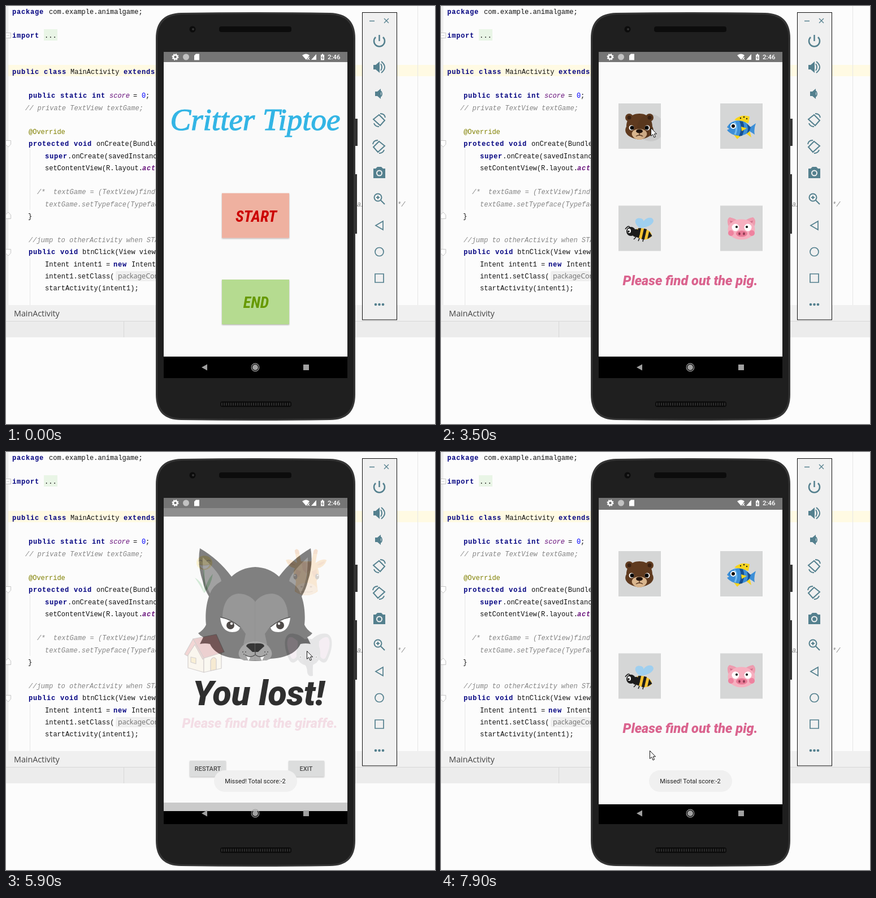
These frames come from a looping animation (759 px wide and 738 px high, 8 s). An HTML page:

```html
<!DOCTYPE html>
<html lang="en">
<head>
<meta charset="utf-8">
<title>Phone game demo</title>
<style>
html, body { margin: 0; width: 100%; height: 100%; overflow: hidden; background: #fcfcfc; }
svg { display: block; width: 759px; height: 738px; }
text { white-space: pre; font-family: Roboto, sans-serif; }
.code text { font: 12px "Liberation Mono", monospace; fill: #111; }
.code .k { font-weight: 700; letter-spacing: .8px; fill: #000080; }
.code .c { font-style: italic; fill: #858585; }
.code .f { font-style: italic; fill: #660e7a; }
.code .n { fill: #0000ff; }
.code .a { fill: #808000; }
.mid { text-anchor: middle; }
.ask { font: italic 900 23.5px Roboto, sans-serif; fill: #da638e; text-anchor: middle; }
.big { font: italic 700 28px "Roboto Condensed", Roboto, sans-serif; font-stretch: 75%; text-anchor: middle; }
.small { font: 500 11px Roboto, sans-serif; fill: #222; text-anchor: middle; }
.line { fill: none; stroke: #54808e; stroke-width: 2; }
</style>
</head>
<body>
<svg viewBox="0 0 759 738">
<defs>
  <clipPath id="glass"><rect x="279" y="81" width="325" height="576"/></clipPath>
  <clipPath id="bearTile"><rect x="314" y="172" width="75" height="80"/></clipPath>
  <clipPath id="restartTile"><rect x="325" y="530" width="64" height="28"/></clipPath>
  <filter id="soft" x="-10%" y="-10%" width="120%" height="130%">
    <feDropShadow dx="0" dy="1.2" stdDeviation=".8" flood-opacity=".3"/>
  </filter>

  <g id="pane">
    <rect x="279" y="81" width="325" height="576" fill="#fafafa"/>
    <rect x="279" y="81" width="325" height="18" fill="#757575"/>
    <rect x="279" y="619" width="325" height="60"/>
  </g>

  <g id="bear">
    <g fill="#5f3a1f"><circle cx="333" cy="197" r="7"/><circle cx="369" cy="197" r="7"/>
    <path d="M351 190C367 190 374 201 374 213C380 223 371 233 351 236C331 233 322 223 328 213C328 201 335 190 351 190Z"/></g>
    <g fill="#3b2212"><circle cx="333" cy="197" r="3.5"/><circle cx="369" cy="197" r="3.5"/></g>
    <path d="M351 217C360 217 366 222 364 228C361 234 356 236 351 236S341 234 338 228C336 222 342 217 351 217Z" fill="#d9b58d"/>
    <g fill="#fff"><circle cx="337" cy="215" r="4.5"/><circle cx="365" cy="215" r="4.5"/></g>
    <circle cx="338" cy="215" r="3.5"/><circle cx="364" cy="215" r="3.5"/>
    <ellipse cx="351" cy="221" rx="6" ry="3.5" fill="#21130c"/>
    <path d="M351 224V229M345 230Q351 226 357 230" fill="none" stroke="#5b3923" stroke-width="1.5"/>
  </g>

  <g id="fish">
    <path d="M519 201Q530 190 546 195L544 207ZM517 226L524 235L532 228ZM540 225L549 232L546 220Z" fill="#f7d51e"/>
    <g fill="#222"><circle cx="530" cy="198" r="1.2"/><circle cx="536" cy="196" r="1.3"/><circle cx="541" cy="199" r="1.2"/></g>
    <path d="M506 214C514 199 537 198 547 214L557 207Q553 218 555 227L546 221C535 233 515 231 506 219L510 217Z" fill="#3d8fd7"/>
    <path d="M528 203Q534 215 527 230L533 229Q539 215 534 204ZM541 208Q545 217 541 225L546 220L548 214Z" fill="#174f91"/>
    <path d="M519 205Q526 214 520 227" fill="none" stroke="#73bbed" stroke-width="3"/>
    <path d="M531 213L541 216L532 221Z" fill="#f7d51e"/>
    <circle cx="517" cy="212" r="5" fill="#fff"/><circle cx="517" cy="212" r="3"/>
  </g>

  <g id="bee">
    <path d="M352 392C338 382 344 372 354 375C361 377 359 385 352 392Q360 371 372 374C382 379 372 391 352 392Z" fill="#9fcfef"/>
    <g transform="rotate(13 356 402)"><ellipse cx="357" cy="402" rx="16" ry="9.5" fill="#f7c331"/>
    <path d="M347 394L352 393V411L347 410ZM357 392.5H362V411.5H357ZM367 395L374 402L367 409Z" fill="#1c1c1c"/></g>
    <circle cx="345" cy="401" r="7" fill="#1c1c1c"/><circle cx="336" cy="398" r="8" fill="#1c1c1c"/>
    <ellipse cx="333" cy="397" rx="3" ry="4" fill="#fff"/><circle cx="332" cy="398" r="1.7"/>
    <path d="M334 391Q332 386 326 394M345 408L341 412M351 410L349 415M358 411L357 416" fill="none" stroke="#1c1c1c" stroke-width="1.5"/>
  </g>

  <g id="pig">
    <path d="M509 390Q504 376 511 373Q520 375 525 379H538Q545 374 552 373Q559 378 554 390Z" fill="#ee9caf"/>
    <path d="M511 379L514 386L519 381ZM552 379L549 386L544 381Z" fill="#cf6e88"/>
    <ellipse cx="531.5" cy="394.5" rx="24" ry="18" fill="#f6afbf"/>
    <g fill="#ee829f"><circle cx="513" cy="401" r="5"/><circle cx="550" cy="401" r="5"/></g>
    <g fill="#fff"><circle cx="521" cy="391" r="6.5"/><circle cx="543" cy="391" r="6.5"/></g>
    <circle cx="523" cy="390" r="2"/><circle cx="541" cy="390" r="2"/>
    <ellipse cx="532" cy="402" rx="10" ry="5.5" fill="#e77995"/>
    <ellipse cx="528" cy="402" rx="1.8" ry="2.6" fill="#8d3850"/><ellipse cx="536" cy="402" rx="1.8" ry="2.6" fill="#8d3850"/>
  </g>

  <g id="flower">
    <path d="M350 208L351 248" stroke="#43ad52" stroke-width="2"/>
    <path d="M350 249Q348 229 334 222Q345 237 350 249ZM351 249Q354 228 366 215Q363 235 351 249Z" fill="#35a748"/>
    <ellipse cx="351" cy="195.5" rx="14" ry="12.5" fill="#fbd52c"/>
    <path d="M340 193Q344 189 347 193M355 193Q359 189 362 193" fill="none" stroke="#6d4c14" stroke-width="1.6"/>
    <path d="M341 198Q351 202 361 198Q358 207 351 207T341 198Z" fill="#fff" stroke="#b37a16"/>
  </g>

  <g id="giraffeHalf">
    <path d="M531 193H522L518 174Q514 169 511 174L515 196Q502 187 495 191Q500 204 511 205Q506 216 513 228L511 246Q520 253 531 253Z" fill="#f6a032"/>
    <path d="M511 174Q514 169 518 174L519 180H512ZM498 193Q505 193 512 200Q503 201 498 193ZM523 195H531V214L525 208ZM513 207L522 211L518 221L512 217Z" fill="#dc721b"/>
    <path d="M531 231Q518 231 511 242Q516 253 531 253Z" fill="#f3b878"/>
    <ellipse cx="512" cy="220" rx="3.5" ry="5" fill="#3a2412"/><circle cx="511" cy="218" r="1.3" fill="#fff"/>
    <ellipse cx="523" cy="238" rx="2" ry="1.4" fill="#8b4c1f"/>
    <path d="M520 246Q526 248 531 247" fill="none" stroke="#a35e2b"/>
  </g>

  <g id="house" stroke="#351e19" stroke-linejoin="round" stroke-width="1.2">
    <path d="M322 356L335 338L350 363V389L322 381Z" fill="#fbe9bf"/>
    <path d="M350 362L381 354V382L350 389Z" fill="#fff1cf"/>
    <path d="M331 330L372 322L386 353L350 364Z" fill="#b3201f"/>
    <path d="M331 330L316 357L321 360L334 340L348 366L350 364Z" fill="#d7433a"/>
    <path d="M362 386V368Q367 359 372 366V384Z" fill="#e7a82b"/>
    <path d="M327 362L336 364V374L327 371Z" fill="#f8c53d"/>
  </g>

  <g id="elephantHalf">
    <path d="M535 338Q520 318 502 321C489 326 493 350 500 364Q505 378 516 367Z" fill="#929298"/>
    <path d="M516 334Q506 324 500 328C494 337 500 354 505 364Q511 369 517 356Z" fill="#e3bfd9"/>
    <path d="M536 329Q512 332 514 361Q518 374 531 377H536Z" fill="#929298"/>
    <circle cx="521" cy="362" r="2.4" fill="#fff"/><circle cx="521" cy="362" r="1.6"/>
  </g>

  <g id="wolfHalf">
    <path d="M441.500 188Q416 189 399 205Q376 174 343 155Q338 183 348 213Q351 227 359 240C352 260 353 282 354 290Q350 299 340 305Q344 310 349 312L343 324Q352 322 361 324C368 340 388 349 414 350Q424 354 441.500 354Z" fill="#646464"/>
    <path d="M348 171Q379 199 381 213Q365 222 361 235Q347 210 348 171Z" fill="#8d8d8d"/>
    <path d="M441.500 250Q430 235 411 235C390 237 383 257 383 278L414 292L424 306L420 325H441.500Z" fill="#808080"/>
    <path d="M379 277Q397 281 414 294Q413 303 400 303Q381 302 379 277Z" fill="#fff"/>
    <path d="M379 276.500Q398 280 414 294" fill="none" stroke="#333" stroke-width="1.500"/>
    <circle cx="397" cy="291" r="7" fill="#27211f"/><circle cx="399" cy="288" r="2.2" fill="#fff"/>
    <path d="M441.500 319Q420 320 413 335Q408 347 421 353H441.500Z" fill="#949494"/>
    <path d="M441.500 323Q425 322 425 328Q432 334 436 338H441.500Z" fill="#080808"/>
    <path d="M425 345L429 354L433 346Z" fill="#fff"/>
    <path d="M441 338V343Q432 350 423 343" fill="none" stroke="#282828" stroke-width="1.4"/>
    <g fill="#333"><circle cx="419" cy="338" r="1"/><circle cx="424" cy="338" r="1"/><circle cx="421" cy="342" r="1"/></g>
  </g>

  <g id="title">
    <use href="#pane"/>
    <text x="441" y="219" class="mid" style="font:italic 55px 'Liberation Serif',serif" fill="#33b5e5" stroke="#33b5e5" stroke-width="1.2">Critter Tiptoe</text>
    <g filter="url(#soft)"><rect x="382" y="330.500" width="119" height="79" fill="#efb1a0"/><rect x="382" y="483" width="119" height="79" fill="#b5db90"/></g>
    <text x="442.500" y="381" class="big" fill="#cc0000">START</text>
    <text x="442.500" y="533" class="big" fill="#669900">END</text>
  </g>

  <g id="first">
    <use href="#pane"/>
    <path d="M314 172h75v80h-75zM494 172h75v80h-75zM314 352.500h75v80h-75zM494 352.500h75v80h-75z" fill="#d5d6d6"/>
    <use href="#bear"/><use href="#fish"/><use href="#bee"/><use href="#pig"/>
    <text x="441" y="493" class="ask">Please find out the pig.</text>
  </g>

  <g id="second">
    <use href="#pane"/>
    <use href="#flower"/><use href="#house"/>
    <use href="#giraffeHalf"/><use href="#giraffeHalf" transform="matrix(-1 0 0 1 1062.500 0)"/>
    <use href="#elephantHalf"/><use href="#elephantHalf" transform="matrix(-1 0 0 1 1070 0)"/>
    <path d="M526 360H545Q542 376 543 395Q535 398 533 389Q533 378 526 372Z" fill="#88888f"/>
    <text x="449" y="487" class="ask">Please find out the giraffe.</text>
  </g>

  <g id="lost">
    <use href="#pane"/>
    <use href="#wolfHalf"/><use href="#wolfHalf" transform="matrix(-1 0 0 1 882 0)"/>
    <text x="447" y="432" class="mid" style="font:italic 900 61px Roboto,sans-serif">You lost!</text>
    <g filter="url(#soft)"><rect x="325" y="530" width="64" height="28" rx="1" fill="#d6d7d7"/><rect x="500" y="530" width="63" height="28" rx="1" fill="#d6d7d7"/></g>
    <text x="357" y="548" class="small">RESTART</text>
    <text x="531" y="548" class="small">EXIT</text>
  </g>
</defs>

<rect width="759" height="738" fill="#fcfcfc"/>
<path d="M0 104H759V124H0Z" fill="#fffae3"/>
<path d="M0 0H4V528H0Z" fill="#f0f0f0"/>
<path d="M3.500 0V528M42.500 253V360M42.500 445V528M728.500 0V528" fill="none" stroke="#e6e6e6"/>
<path d="M0 528H759V556H0Z" fill="#f0f0f0"/>
<path d="M0 556H759V585H0Z" fill="#ececec"/>
<path d="M0 556.500H759M208.500 556V585" stroke="#d8d8d8"/>
<g fill="#fff" stroke="#c6c6c6"><path d="M-1 237.500H8.500V244L4 249L-1 244ZM-1 429.500H8.500V436L4 441L-1 436ZM-1 375.500H8.500V369L4 364L-1 369ZM-1 47.500H8.500V56.500H-1ZM1 52H6"/></g>
<rect x="67" y="41" width="24" height="20" fill="#e9f5e6"/>
<rect x="194" y="468" width="90" height="18" rx="3" fill="#efefef"/>
<text x="198" y="481" style="font:12.500px 'Noto Sans',sans-serif" fill="#777">packageContext:</text>
<text x="14" y="548" style="font:14.300px 'Open Sans',sans-serif" fill="#444">MainActivity</text>
<g class="code" id="code"></g>

<rect x="630.500" y="11.500" width="61" height="542.500" fill="#f0f0f0" stroke="#111"/>
<path d="M643 26.500H652M669 22L677 30M677 22L669 30" class="line" style="stroke-width:1.300"/>
<g class="line">
  <path d="M654 55A9.500 9.500 0 1 0 667 55M660.500 51V62" stroke-width="2.500"/>
  <path d="M663 102Q667 108 663 114M664 98Q676 108 664 118"/>
  <path d="M663 150Q667 155 663 160"/>
  <g id="turn"><path d="M660 192L670 202L662 211L650 200Z"/><path d="M651 207Q653 213 660 213M662 190Q670 190 671 197"/></g>
  <use href="#turn" transform="matrix(-1 0 0 1 1320 47)"/>
  <circle cx="658" cy="338" r="6.500"/><path d="M663 343L670 350M655 338H661M658 335V341"/>
  <path d="M667 380V395L654 387.500Z" stroke-width="1.700"/><circle cx="660.500" cy="434" r="7.500" stroke-width="1.700"/><path d="M653 473H668V488H653Z" stroke-width="1.700"/>
</g>
<g fill="#54808e">
  <path d="M650 104H654L661 98V118L654 112H650ZM653 151H657L663 146V164L657 159H653ZM650 287H654L657 284H664L667 287H671V304H650Z"/>
  <circle cx="654" cy="527" r="2.300"/><circle cx="660.500" cy="527" r="2.300"/><circle cx="667" cy="527" r="2.300"/>
</g>
<circle cx="660.500" cy="295" r="4.500" fill="#54808e" stroke="#f0f0f0" stroke-width="2"/>

<path d="M617 199H622V247H617ZM617 297H621V402H617Z" fill="#333"/>
<path d="M310 12Q441 10 573 12Q618 13 618 57V686Q618 731 573 731Q441 733 310 731Q265 731 265 686V57Q265 13 310 12Z" fill="#353535"/>
<path d="M311 15Q441 13 572 15Q615 16 615 58V685Q615 728 572 728Q441 730 311 728Q268 728 268 685V58Q268 16 311 15Z" fill="#1f1f1f"/>
<rect x="377" y="36" width="128" height="10" rx="4" fill="#0c0c0c"/>
<rect x="379" y="698" width="126" height="10" rx="4" fill="#0c0c0c"/>
<path d="M381 703H503" stroke="#2e2e2e" stroke-width="5" stroke-dasharray="2 2"/>
<circle cx="330" cy="41" r="5.500" fill="#0c0c0c"/><circle cx="331" cy="41" r="2" fill="#333"/>

<g clip-path="url(#glass)">
  <use id="under"/>
  <g clip-path="url(#bearTile)"><circle id="bearRipple" cx="371" cy="215"/></g>
  <g clip-path="url(#restartTile)"><circle id="restartRipple" cx="365" cy="534"/></g>
  <use id="over"/>
  <g fill="#fff">
    <circle cx="299.500" cy="90" r="3.500" fill="none" stroke="#fff" stroke-width="2.600"/>
    <circle cx="299.500" cy="90" r="5.300" fill="none" stroke="#fff" stroke-width="1.500" stroke-dasharray="2.100 2.060"/>
    <circle cx="318.500" cy="90" r="5.500" fill="#c2c2c2"/>
    <path d="M336 84.500H342V95.500H333V87.500ZM524 87Q531 82 537 87L531 95ZM540 95H549V85ZM557 86H559V84.500H561V86H563V95.500H557Z"/>
    <path d="M533 90L537 95M537 90L533 95" stroke="#fff" stroke-width="1.200"/>
    <path d="M560.500 88L558.500 91.500H561.500L559.500 94" fill="none" stroke="#757575"/>
    <text x="569" y="94" style="font:500 11.500px Roboto,sans-serif">2:46</text>
  </g>
  <g fill="#a1a1a1"><path d="M356 632.500V643.500L346 638ZM526 633H536V643H526Z"/><circle cx="441" cy="638" r="5"/><circle cx="441" cy="638" r="6.800" fill="none" stroke="#a1a1a1" stroke-width="1.200"/></g>
  <g id="toast"><rect x="368" y="562" width="147" height="38" rx="19" fill="#f0f0f0"/><text id="message" x="441" y="585" class="small" style="font-weight:400"></text></g>
</g>
<path id="cursor" d="M.500 .500V14.500L3.800 11.500L6 17L8.500 16L6.300 10.800H10.500Z" fill="#fff" stroke="#111"/>
</svg>

<script>
const el = id => document.getElementById(id);
const clamp = v => Math.max(0, Math.min(1, v));

// Each line: baseline, then x / class / text triples.
const lines = [
  [14, 11, 'k', 'package', 76, '', 'com.example.animalgame;'],
  [56, 11, 'k', 'import', 68, '', '...'],
  [120, 11, 'k', 'public class', 114, '', 'MainActivity', 208, 'k', 'extends'],
  [162, 40, 'k', 'public static int', 183, 'f', 'score', 225, '', '=', 240, 'n', '0', 247, '', ';'],
  [184, 34, 'c', '// private TextView textGame;'],
  [226, 40, 'a', '@Override'],
  [247, 40, 'k', 'protected void', 160, '', 'onCreate(Bundle'],
  [269, 69, 'k', 'super', 109, '', '.onCreate(savedInstance'],
  [290, 69, '', 'setContentView(R.layout.', 241, 'k f', 'act'],
  [332, 55, 'c', '/*  textGame = (TextView)find'],
  [354, 69, 'c', 'textGame.setTypeface(Typeface', 621, 'c', 'ai', 692, 'c', '*/'],
  [375, 39, '', '}'],
  [417, 40, 'c', '//jump to otherActivity when START'],
  [438, 40, 'k', 'public void', 135, '', 'btnClick(View view'],
  [460, 69, '', 'Intent intent1 =', 190, 'k', 'new', 222, '', 'Intent'],
  [481, 69, '', 'intent1.setClass('],
  [502, 69, '', 'startActivity(intent1);']
];
for (const [y, ...parts] of lines) {
  for (let i = 0; i < parts.length; i += 3) {
    const t = document.createElementNS('http://www.w3.org/2000/svg', 'text');
    t.setAttribute('x', parts[i]);
    t.setAttribute('y', y);
    t.setAttribute('class', parts[i + 1]);
    t.textContent = parts[i + 2];
    el('code').append(t);
  }
}

const screens = [[-1000, 'title'], [1700, 'first'], [4200, 'second'], [5800, 'lost'], [7700, 'first']];
const cursorPath = [
  [300, 694, 106], [800, 441, 356], [2500, 441, 356], [2900, 371, 215], [4200, 371, 215],
  [4700, 507, 305], [4900, 532, 351], [6200, 532, 351], [6500, 400, 563], [6700, 365, 534],
  [7600, 365, 534], [7700, 369, 527]
];

function cursorAt(t) {
  const i = cursorPath.findIndex(k => k[0] > t);
  if (i < 0) return cursorPath.at(-1).slice(1);
  const [t0, x0, y0] = cursorPath[i - 1], [t1, x1, y1] = cursorPath[i];
  const p = (t - t0) / (t1 - t0);
  return [x0 + (x1 - x0) * p, y0 + (y1 - y0) * p];
}

function ripple(id, t, start, end, radius) {
  const on = t >= start && t < end;
  el(id).setAttribute('r', on ? radius * clamp((t - start + 100) / 200) : 0);
  el(id).setAttribute('opacity', .06);
}

function render(t) {
  const i = screens.findLastIndex(s => s[0] <= t);
  const u = clamp(.106 + .0032 * (t - screens[i][0]));
  el('under').setAttribute('href', '#' + screens[Math.max(0, i - 1)][1]);
  el('over').setAttribute('href', '#' + screens[i][1]);
  el('over').setAttribute('transform', `translate(0 ${Math.round(46 * (1 - u) ** 2)})`);
  el('over').setAttribute('opacity', 1 - (1 - clamp(u * 1.32)) ** 2);

  // Ripples lie above a settled window, so fold it into the lower layer.
  if (u === 1) {
    el('under').setAttribute('href', '#' + screens[i][1]);
    el('over').setAttribute('opacity', 0);
  }
  ripple('bearRipple', t, 3500, 4200, 48);
  ripple('restartRipple', t, 7000, 7500, 60);

  el('toast').setAttribute('opacity', clamp((t - 3800) / 300));
  el('message').textContent = 'Missed! Total score:-' + (t < 5700 ? 1 : 2);

  el('cursor').setAttribute('visibility', t < 300 ? 'hidden' : 'visible');
  if (t >= 300) el('cursor').setAttribute('transform', `translate(${cursorAt(t).map(Math.round)})`);
}

const begin = performance.now();
function tick(now) {
  const t = Math.max(0, now - begin) % 8000;
  render(Math.floor(t / 100) * 100);
  requestAnimationFrame(tick);
}
render(0);
requestAnimationFrame(tick);
</script>
</body>
</html>
```
